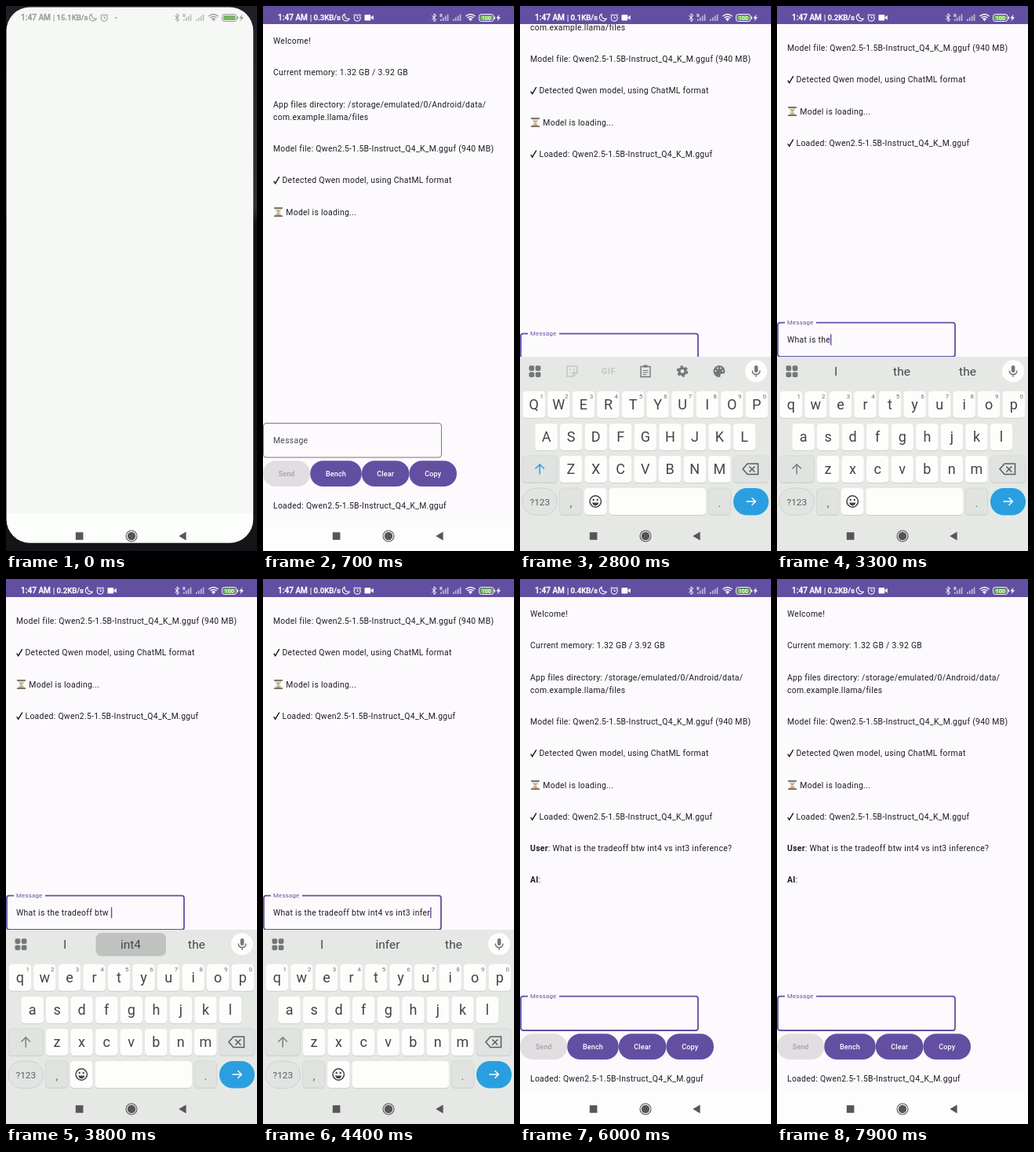
These frames come from a looping animation (320x693 px, 8 s). An HTML page:

```html
<!DOCTYPE html>
<html lang="en">
<head>
<meta charset="utf-8">
<title>Chat on a phone</title>
<style>
html, body { margin: 0; width: 100%; height: 100%; overflow: hidden; background: #fdfafd; }
svg { display: block; width: 320px; height: 693px; }
text { font-family: Roboto, sans-serif; white-space: pre; }
.body { font-size: 10.4px; letter-spacing: .3px; fill: #1d1b20; }
.btn { font-size: 9.1px; font-weight: 500; letter-spacing: .08px; text-anchor: middle; }
.key { font-size: 18px; fill: #414543; text-anchor: middle; }
.mark { font-size: 15px; fill: #6b6f6d; text-anchor: middle; }
.hint { font-size: 8px; fill: #6b6f6d; text-anchor: middle; }
.word { font-size: 15.5px; fill: #454947; text-anchor: middle; }
.clock { font-weight: 500; fill: currentColor; stroke: currentColor; stroke-width: .3px; }
.line { fill: none; stroke: currentColor; }
</style>
</head>
<body>
<svg id="stage" viewBox="0 0 320 693"></svg>
<script>
const LOOP = 8000, STEP = 100, PAN = 128, KEYBOARD = 247;
const PURPLE = '#624fa2', PAPER = '#fdfafd', BOARD = '#e5e8e5';
const QUESTION = 'What is the tradeoff btw int4 vs int3 inference?';
const MODEL = 'Qwen2.5-1.5B-Instruct_Q4_K_M.gguf';

// start time in ms, value
const SPEEDS = [[0, '15.1'], [400, '0.3'], [1500, '0.1'], [3100, '0.2'], [4300, '0.0'],
  [5300, '0.4'], [6300, '0.1'], [7200, '0.2']];
const TYPING = [[3000, 0], [3700, 25], [3800, 25], [3900, 30], [4600, 48]];
const SENT = 4700;

const rect = (x, y, w, h, rx, fill, more = '') =>
  `<rect x="${x}" y="${y}" width="${w}" height="${h}" rx="${rx}" fill="${fill}" ${more}/>`;
const text = (x, y, kind, words, more = '') => `<text x="${x}" y="${y}" class="${kind}" ${more}>${words}</text>`;
const line = (d, width = 1, more = '') => `<path d="${d}" class="line" stroke-width="${width}" ${more}/>`;
const shape = (d, fill = 'currentColor') => `<path d="${d}" fill="${fill}"/>`;
const group = (id, inner, more = '') => `<g id="${id}" ${more}>${inner}</g>`;
const dot = (x, y, r, fill = 'currentColor', more = '') => `<circle cx="${x}" cy="${y}" r="${r}" fill="${fill}" ${more}/>`;

const tick = y => line(`M13.7 ${y + 1.2}l2 3L20.8 ${y - 4.3}`, 1.3, 'color="#111"');
const hourglass = y => shape(`M15 ${y - 5}h9q0 3-3 5q3 2 3 5h-9q0-3 3-5q-3-2-3-5z`, '#cbd8dd') +
  shape(`M16.5 ${y - 2}h6l-3 2.6zM19.5 ${y + 1}l3.3 3.8h-6.6z`, '#d8a24f') +
  rect(14, y - 6, 11, 1.7, .5, '#75685a') + rect(14, y + 4.3, 11, 1.7, .5, '#75685a');

function transcript() {
  return text(13, 48, 'body', 'Welcome!') +
    text(13, 88, 'body', 'Current memory: 1.32 GB / 3.92 GB') +
    text(13, 129, 'body', 'App files directory: /storage/emulated/0/Android/data/') +
    text(13, 145, 'body', 'com.example.llama/files') +
    group('loading',
      text(13, 185, 'body', `Model file: ${MODEL} (940 MB)`) +
      tick(221.5) + text(24.5, 225, 'body', 'Detected Qwen model, using ChatML format') +
      hourglass(262) + text(29.3, 266, 'body', 'Model is loading...')) +
    group('loaded', tick(302) + text(24.5, 306, 'body', `Loaded: ${MODEL}`)) +
    group('chat',
      text(13, 346, 'body', `<tspan font-weight="700">User</tspan>: ${QUESTION}`) +
      text(13, 386, 'body', '<tspan font-weight="700">AI</tspan>:'));
}

function form() {
  const button = (x, w, label, on = true) => rect(x, 578.3, w, 32.7, 16.3, on ? PURPLE : '#e0dee0') +
    text(x + w / 2, 598.4, 'btn', label, `fill="${on ? '#fff' : '#a5a2a6'}"`);
  return group('idle', rect(.5, 530.5, 227, 43.5, 3.5, 'none', 'stroke="#7b757f"') +
      text(13, 556, 'body', 'Message', 'fill-opacity=".8"')) +
    group('focused', rect(1, 530.7, 226, 43.3, 3, 'none', `stroke="${PURPLE}" stroke-width="1.8"`) +
      rect(10, 528, 40, 5, 0, PAPER) +
      text(13, 533, '', 'Message', `font-size="7.8" letter-spacing=".25" fill="${PURPLE}"`)) +
    `<clipPath id="inner"><rect x="12" y="538" width="206" height="30"/></clipPath>
     <g clip-path="url(#inner)"><g id="scroller">${text(13, 556, 'body', '', 'id="draft"')}
     ${rect(13, 545.3, 1.4, 14, 0, PURPLE, 'id="caret"')}</g></g>` +
    button(0, 60.2, 'Send', false) + button(60.2, 65.6, 'Bench') +
    button(125.8, 60.6, 'Clear') + button(186.4, 60.6, 'Copy') +
    text(13, 639, 'body', `Loaded: ${MODEL}`);
}

function toolbar() {
  const grid = [11.5, 19.7].flatMap(x => [457.2, 465.4].map(y => rect(x, y, 6.7, 6.7, 1.8, '#737775'))).join('');
  const gear = dot(207, 464.5, 4, 'none', 'stroke="#737775" stroke-width="3.2"') +
    dot(207, 464.5, 6.2, 'none', 'stroke="#737775" stroke-width="2.2" stroke-dasharray="3.3 3.19"');
  const palette = shape('M254 457a7.5 7.5 0 1 0 0 15q2 0 1.5-2.2t1.5-2.3h2q2.5-.3 2.5-3q-.5-7-7.5-7.5z', '#737775') +
    [[249.5, 464], [252, 460.5], [256, 460.5], [258.5, 464]].map(p => dot(...p, 1.1, BOARD)).join('');
  return grid +
    group('tools',
      `<g color="#c3c7c4">${line('M60 458h13v8l-5 5h-8zM68 471v-5h5', 1.6)}${dot(64, 462, 1)}${dot(69, 462, 1)}
       ${line('M63.5 466q2 2 4 0', 1)}</g>` +
      text(113, 468.3, '', 'GIF', 'font-size="10.5" font-weight="700" fill="#c3c7c4" text-anchor="middle" letter-spacing=".8"') +
      `<g color="#737775">${line('M154 458.5h12v13h-12z', 1.4)}${line('M156.5 463.5h7M156.5 466h7M156.5 468.7h4.5', 1)}
       ${rect(157.5, 456.5, 5, 3, 1, 'currentColor')}</g>` + gear + palette) +
    group('hints', rect(114.5, 450, 89.5, 29.5, 7, '#bfc2bf', 'id="pressed"') +
      text(75, 470.3, 'word', 'I') + text(159, 470.3, 'word', '', 'id="guess"') + text(243, 470.3, 'word', 'the')) +
    dot(301, 464.3, 14, '#fdfefc') +
    rect(298.8, 457, 4.6, 9, 2.3, '#737775') +
    `<g color="#737775">${line('M296.3 463.5q0 5 4.8 5t4.8-5M301.1 468.5v3.2', 1.5)}</g>`;
}

function keyboard() {
  const cap = (x, y, w, plain = true) => rect(x, y + 1, w, 34, 4.5, '#cdd1ce') +
    rect(x, y, w, 34, 4.5, plain ? '#fdfefc' : '#e0e3e0', plain ? '' : 'stroke="#d0d4d1" stroke-width=".7"');
  const row = (letters, x0, y, numbered) => [...letters].map((c, i) => {
    const x = x0 + 31.55 * i;
    return cap(x - 14.2, y, 28.4) + text(x, Math.round(y + 23.2), 'key', c, 'data-key') +
      (numbered ? text(x + 10, y + 8.8, 'hint', (i + 1) % 10) : '');
  }).join('');
  const bottom = rect(3, 613, 44.5, 34.5, 17.2, '#e1e4e1', 'stroke="#c8ccc9" stroke-width=".8"') +
    text(25.3, 634.5, '', '?123', 'font-size="11.8" fill="#5a5e5c" text-anchor="middle"') +
    cap(50.5, 613, 28.4, false) + text(65, 637, 'mark', ',') +
    cap(82, 613, 28.4) + cap(113.5, 613, 123.5) +
    cap(240.3, 613, 28.4, false) + text(254.5, 637, 'mark', '.') +
    `<g color="#3f4341">${line('M103.4 630a7.2 7.2 0 1 1-14.4 0a7.2 7.2 0 1 1 14.4 0', 1.5)}
     ${dot(93.7, 628, 1.2)}${dot(98.7, 628, 1.2)}${shape('M92 631.5h8.4q-1 3.7-4.2 3.7t-4.2-3.7z')}</g>` +
    rect(272, 613, 45, 34.5, 17.2, '#2a9fe0') +
    line('M288.5 630h11.5M295.5 625.2l4.8 4.8l-4.8 4.8', 1.5, 'color="#fff"');
  return rect(0, 446, 320, 250, 0, BOARD) + toolbar() +
    row('QWERTYUIOP', 17.8, 489.7, true) + row('ASDFGHJKL', 33.6, 531) +
    cap(3, 572, 44.5, false) + cap(272, 572, 45, false) + row('ZXCVBNM', 65, 572) +
    `<g id="shift">${line('M25.2 595.5v-12.5M19.5 588.5l5.7-5.7l5.7 5.7', 1.5)}</g>` +
    `<g color="#5a5e5c">${line('M290 582h13.5v13.5h-13.5l-6-6.7zM292.3 585.5l7 7M299.3 585.5l-7 7', 1.5)}</g>` + bottom;
}

function statusBar() {
  const bars = x => [0, 1, 2, 3].map(i => rect(x + i * 2.9, 16.5 - i * 2, 1.7, 2.5 + i * 2, .5, 'currentColor', 'opacity=".6"')).join('');
  const arc = r => `M${264.5 - r * .72} ${19 - r * .7}Q264.5 ${19 - r * 1.3} ${264.5 + r * .72} ${19 - r * .7}`;
  return text(19, 18.4, 'clock', '1:47 AM', 'font-size="10.1"') +
    rect(60.6, 11, .9, 9, 0, 'currentColor') +
    text(64.6, 18.4, 'clock', '', 'id="speed" font-size="9.6"') +
    group('leftIcons',
      line('M104 10.2q-3.4 2-2.5 5.4q1.6 4 5.6 3.3q2.2-.6 3.2-2.6q-6.8.6-6.3-6.1z', 1.1) +
      dot(120.2, 15.2, 4, 'none', 'stroke="currentColor" stroke-width="1.1"') +
      line('M115.2 12.2l2.4-2M125.2 12.2l-2.4-2M120.2 13v2.4h1.8', 1) +
      group('camera', rect(129.5, 11, 7.8, 7.4, 1.2, 'currentColor') + shape('M137 14.7l3.8-3v6z')) +
      group('bullet', dot(135, 15, 1.1))) +
    line('M215.3 12.2l5.6 5.2l-2.8 2.4v-10l2.8 2.4l-5.6 5.2', 1) +
    text(227, 14, '', 'R', 'font-size="5.5" font-weight="700" fill="currentColor" text-anchor="middle"') +
    bars(226) + bars(242) +
    line(arc(8.5) + arc(5.7) + arc(3), 1.3) + shape('M262.8 17.2h3.4l-1.7 2.2z') +
    rect(275.5, 10.5, 18.5, 9, 2.8, 'none', 'stroke="currentColor"') +
    rect(277, 12, 15.5, 6, 1.5, '#6dbd4c') + rect(294.8, 13.2, 1.2, 3.6, .5, 'currentColor') +
    text(284.8, 17.7, '', '100', 'font-size="7" font-weight="500" fill="currentColor" text-anchor="middle"') +
    shape('M301.5 10.5l-4.2 5h2.6l-1.4 4l4.6-5.3h-2.8z');
}

const navigation = () => rect(0, 655, 320, 38, 0, '#fdfdfd', 'id="navBack"') +
  rect(193, 659, 65, 29, 14.5, '#dee1de', 'id="ripple"') +
  rect(88.8, 669.2, 9.6, 9.6, 0, '#565656') +
  dot(160, 674, 7, 'none', 'stroke="#565656" stroke-width="1.1"') + dot(160, 674, 5.2, '#565656') +
  shape('M220.3 674l9.3-5.6v11.2z', '#565656');

const stage = document.getElementById('stage');
stage.innerHTML = `<defs><linearGradient id="night" x2="0" y2="1">
    <stop stop-color="#201e26"/><stop offset=".37" stop-color="#313134"/>
    <stop offset=".4" stop-color="#111112"/><stop offset="1" stop-color="#151419"/></linearGradient></defs>` +
  rect(0, 0, 320, 693, 0, PAPER) +
  group('app', transcript() + form()) +
  rect(0, 0, 320, 23, 0, PURPLE, 'id="statusBack"') +
  group('keys', keyboard()) +
  group('splash', rect(0, 0, 320, 693, 0, 'url(#night)') +
    `<g id="card"><clipPath id="round"><rect x=".6" y="1.5" width="314.6" height="681.3" rx="30"/></clipPath>
     <g clip-path="url(#round)">${rect(0, 0, 320, 645, 0, '#f6f8f5')}${rect(0, 645, 320, 48, 0, '#fcfefc')}</g></g>`) +
  group('nav', navigation()) + group('status', statusBar());

const el = id => document.getElementById(id);
const show = (id, on) => { el(id).style.display = on ? '' : 'none'; };
const portion = (t, start, length) => Math.min(1, Math.max(0, (t - start) / length));
const easeOut = p => 1 - (1 - p) ** 3;
const latest = (table, t) => table.filter(([start]) => start <= t).pop()[1];

function typedCount(t) {
  if (t < TYPING[0][0] || t >= SENT) return 0;
  const next = TYPING.findIndex(([time]) => time > t);
  if (next < 0) return QUESTION.length;
  const [t0, n0] = TYPING[next - 1], [t1, n1] = TYPING[next];
  return Math.round(n0 + (n1 - n0) * (t - t0) / (t1 - t0));
}

function draw(t) {
  const opened = t >= 400, focused = t >= 1800;
  show('splash', t < 200);
  el('card').style.transform = t < 100 ? '' : 'translate(-4px,-20px) scale(1.1)';
  show('app', opened);
  show('statusBack', opened);
  show('loading', t >= 700);
  show('loaded', t >= 2400);
  show('chat', t >= SENT);
  show('idle', !focused);
  show('focused', focused);

  const pan = Math.round(PAN * (easeOut(portion(t, 2670, 250)) - easeOut(portion(t, 4810, 136))));
  const drop = Math.round(KEYBOARD * (1 - easeOut(portion(t, 2500, 220)) + portion(t, 4870, 210) ** 2));
  const keysUp = t >= 2600 && t < 5100;
  el('app').setAttribute('transform', `translate(0 ${-pan})`);
  el('keys').setAttribute('transform', `translate(0 ${drop})`);
  show('keys', keysUp);
  show('ripple', t >= 4900 && t < 5100);
  show('navBack', t >= 200);
  el('navBack').setAttribute('fill', keysUp ? BOARD : '#fdfdfd');

  const draft = QUESTION.slice(0, typedCount(t));
  const typing = draft.length > 0;
  el('draft').textContent = draft;
  const end = typing ? el('draft').getComputedTextLength() : 0;
  el('caret').setAttribute('x', 13 + end);
  el('scroller').setAttribute('transform', `translate(${Math.min(0, 201 - end)} 0)`);
  show('caret', focused && (typing || [1, 2].includes(t / STEP % 4)));

  show('tools', !typing);
  show('hints', typing);
  show('pressed', t === 3800);
  el('guess').textContent = draft.split(' ').pop() || 'int4';
  el('shift').style.color = typing ? '#7b7f7d' : '#2a9fe0';
  for (const key of stage.querySelectorAll('[data-key]'))
    key.textContent = typing ? key.textContent.toLowerCase() : key.textContent.toUpperCase();

  el('speed').textContent = latest(SPEEDS, t) + 'KB/s';
  el('leftIcons').setAttribute('transform', `translate(${opened ? 0 : 5} 0)`);
  el('status').style.color = opened ? '#fff' : '#999b99';
  show('camera', opened);
  show('bullet', !opened);
}

const began = performance.now();
function frame() {
  const t = (performance.now() - began) % LOOP;
  draw(Math.floor(t / STEP) * STEP);
  requestAnimationFrame(frame);
}
frame();
</script>
</body>
</html>
```
